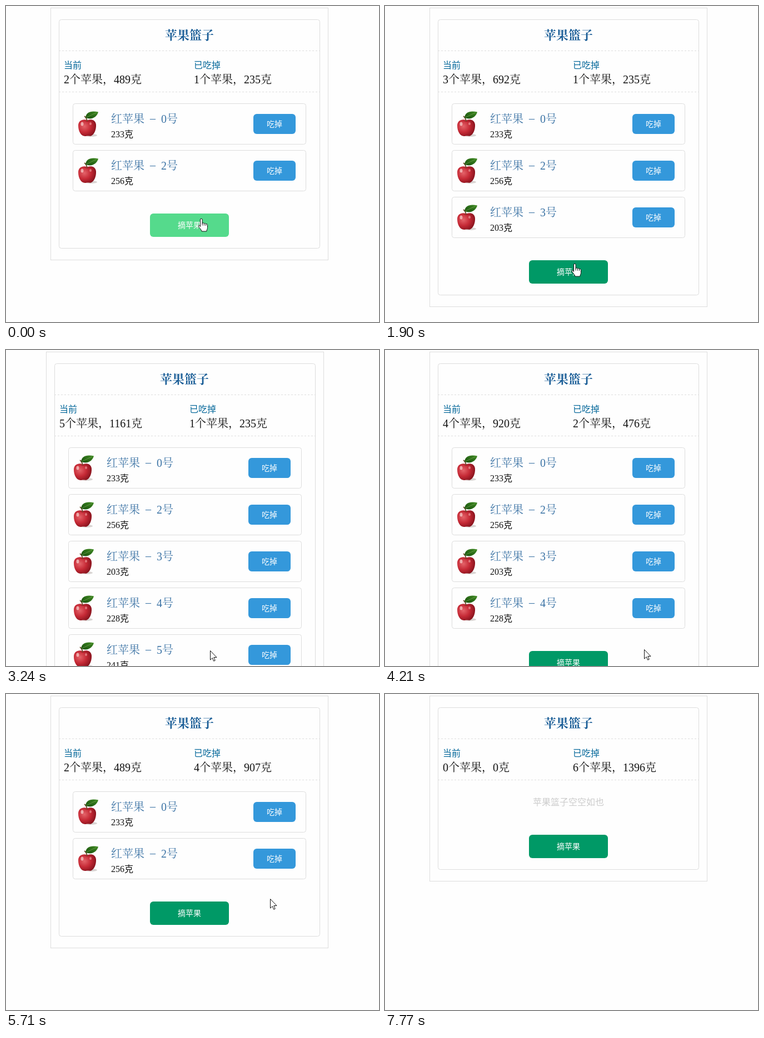
An HTML page for the animation above (7900 ms loop, 671 px wide and 568 px high).

```html
<!DOCTYPE html>
<html lang="zh-CN">
<head>
<meta charset="utf-8">
<title>苹果篮子</title>
<style>
  html, body { margin: 0; width: 100%; height: 100%; overflow: hidden; background: #fefefe; }
  svg { display: block; width: 671px; height: 568px; }
  text {
    font-family: "Liberation Serif", "Noto Serif CJK SC", "Noto Sans CJK SC", "Noto Sans CJK", serif;
    font-size: 20px; font-weight: 300; fill: #111; white-space: pre;
  }
  .mid { text-anchor: middle; }
  .title { font-size: 22px; font-weight: 700; fill: #185c96; }
  .name { fill: #3a72a4; word-spacing: 5px; }
  .label, .small, .btn, .empty {
    font-family: "Liberation Serif", "Noto Sans CJK SC", "Noto Sans CJK", sans-serif;
    font-size: 16px;
  }
  .label { fill: #069; }
  .btn { font-size: 14px; fill: #fff; }
  .empty { fill: #ccc; }
  .line { fill: none; stroke: #ddd; }
  .dash { stroke: #ddd; stroke-dasharray: 3 3; stroke-dashoffset: 1; }
  .cursor { fill: #fff; stroke: #111; stroke-linejoin: round; }
</style>
</head>
<body>
<svg viewBox="0 0 671 568">
  <defs>
    <radialGradient id="skin" cx=".34" cy=".4" r=".72">
      <stop offset="0" stop-color="#e4646a"/>
      <stop offset=".5" stop-color="#c62a36"/>
      <stop offset="1" stop-color="#80101a"/>
    </radialGradient>
    <linearGradient id="leaf" x1="0" y1="1" x2="1" y2="0">
      <stop offset="0" stop-color="#174f0e"/>
      <stop offset="1" stop-color="#3f8a22"/>
    </linearGradient>
    <g id="apple">
      <ellipse cx="153" cy="232.500" rx="11" ry="2.500" fill="#d8d4d2"/>
      <path fill="url(#skin)" d="M146 205.500C140 202.500 130 205 130 215C130 225 135 234 142 234C144 234 145 233.500 147 233.500C149 233.500 151 234 153 233.500C159 231 162.500 222 162 213C161 204 152 203 146 205.500Z"/>
      <path fill="#7a1018" opacity=".55" d="M140 206Q146 209.500 153 206Q147 207 140 206Z"/>
      <ellipse cx="137" cy="212" rx="2.500" ry="3.500" fill="#f8ccca" opacity=".75"/>
      <ellipse cx="152" cy="211.500" rx="2" ry="2.500" fill="#f0a8a6" opacity=".6"/>
      <path fill="none" stroke="#6b4a2a" stroke-width="1.800" d="M141 198Q145 201 146 207"/>
      <path fill="url(#leaf)" d="M143 200.500C144 191 153 187.500 166 190.500C164 199 154 206 143 200.500Z"/>
      <path fill="none" stroke="#86b45e" stroke-width=".6" d="M145 200Q154 196 163 191.500"/>
    </g>
  </defs>

  <g id="page">
    <rect id="outer" class="line" x="80.500" y="3.500" width="499"/>
    <rect id="inner" class="line" x="95.500" y="24.500" width="469" rx="4"/>
    <path class="dash" d="M96 80.500H564M96 154.500H564"/>
    <text id="title" class="mid title" y="60">苹果篮子</text>
    <text class="label" x="104" y="112">当前</text>
    <text class="label" x="338" y="112">已吃掉</text>
    <text id="now" x="104" y="139"></text>
    <text id="eaten" x="338" y="139"></text>
    <text id="empty" class="mid empty" x="330" y="200">苹果篮子空空如也</text>
    <g id="cards"></g>
    <g id="pick">
      <rect id="pickBox" x="259" width="142" height="42" rx="6"/>
      <text class="mid btn" x="330" y="26">摘苹果</text>
    </g>
  </g>

  <g id="cursor" class="cursor">
    <path id="arrow" d="M.5 .5V17L4.300 13.500L6.700 19.200L9.200 18.100L6.800 12.500H12Z"/>
    <g id="hand">
      <path d="M-1.500 14.500V2a1.800 1.800 0 0 1 3.600 0V9C2.100 7.400 5.400 7.600 5.400 9.400C5.600 8.200 8.600 8.400 8.600 10.200C9 9.200 11.500 9.600 11.500 11.400V16.500C11.500 19 10 20 9.800 23H1C.8 20.500 -2.500 17.500 -4.800 14C-5.600 12.400 -3.400 11.400 -2.600 12.600Z"/>
      <path fill="none" d="M2.100 9v3.500M5.400 9.400v3.300M8.600 10.200v2.800"/>
    </g>
  </g>
</svg>

<script>
const LOOP = 7900, PITCH = 84, FULL = 5;
const $ = id => document.getElementById(id);

// Times tell when an apple enters the basket and when it is eaten.
const apples = [
  { no: 0, weight: 233, from: 0, to: 7090 },
  { no: 2, weight: 256, from: 0, to: 6380 },
  { no: 3, weight: 203, from: 680, to: 5710 },
  { no: 4, weight: 228, from: 1917, to: 4880 },
  { no: 5, weight: 241, from: 3110, to: 4210 }
];
const eatenBefore = { weight: 235 };
const picking = [[410, 680], [1640, 1917], [2840, 3110]];

const startPoint = [351, 382];
const moves = [
  { from: 680, to: 1080, steps: 3, at: [341, 463] },
  { from: 1917, to: 2470, steps: 4, at: [347, 546] },
  { from: 3110, to: 3240, steps: 1, at: [367, 540] },
  { from: 3240, to: 3780, steps: 4, at: [464, 534] },
  { from: 3780, to: 3910, steps: 1, at: [466, 538] },
  { from: 4210, to: 4610, steps: 3, at: [473, 462] },
  { from: 4880, to: 5300, steps: 3, at: [475, 368] },
  { from: 5710, to: 6110, steps: 3, at: [475, 291] },
  { from: 6380, to: 6810, steps: 3, at: [474, 207] },
  { from: 7090, to: 7770, steps: 5, at: [648, 581] }
];

$("cards").innerHTML = apples.map((a, i) => `
  <g class="card" transform="translate(0 ${i * PITCH})">
    <rect class="line" x="120.500" y="175.500" width="419" height="73" rx="4"/>
    <use href="#apple"/>
    <text class="name" x="189" y="210">红苹果 <tspan dy="-1">–</tspan><tspan dy="1"> ${a.no}号</tspan></text>
    <text class="small" x="189" y="236">${a.weight}克</text>
    <g class="eat">
      <rect x="445" y="194" width="76" height="36" rx="6" fill="#3498db"/>
      <text class="mid btn" x="483" y="217">吃掉</text>
    </g>
  </g>`).join("");
const cards = [...document.querySelectorAll(".card")];
const eatButtons = [...document.querySelectorAll(".eat")];

const show = (el, on) => el.setAttribute("display", on ? "inline" : "none");
const inside = (x, y, left, top, w, h) => x >= left && x < left + w && y >= top && y < top + h;
const ease = p => p * p * (3 - 2 * p);
const summary = list => `${list.length}个苹果，${list.reduce((sum, a) => sum + a.weight, 0)}克`;

// The pointer advances in a few discrete jumps per move.
function pointer(t) {
  let [x, y] = startPoint;
  for (const m of moves) {
    if (t < m.from) break;
    const part = Math.min(1, (t - m.from) / (m.to - m.from));
    const p = ease(Math.floor(part * m.steps + 1e-6) / m.steps);
    x += (m.at[0] - x) * p;
    y += (m.at[1] - y) * p;
  }
  return [Math.round(x), Math.round(y)];
}

function draw(t) {
  const basket = apples.filter(a => t >= a.from && t < a.to);
  const eaten = [eatenBefore, ...apples.filter(a => t >= a.to)];
  const n = basket.length;
  const grow = n ? n * PITCH : 48;
  const pickTop = 205 + grow;

  // A full basket brings in a scroll bar, which shifts the centred page.
  const shift = n === FULL ? -8 : 0;
  const nudge = n === FULL ? -1 : 0;
  $("page").setAttribute("transform", `translate(${shift} 0)`);
  $("outer").setAttribute("height", 285 + grow);
  $("inner").setAttribute("height", 243 + grow);
  $("title").setAttribute("x", 330 + nudge);
  $("now").textContent = summary(basket);
  $("eaten").textContent = summary(eaten);
  show($("empty"), !n);
  cards.forEach((card, i) => show(card, i < n));
  eatButtons.forEach(b => b.setAttribute("transform", `translate(${nudge} 0)`));

  const [x, y] = pointer(t);
  const overPick = inside(x, y, 259 + shift, pickTop, 142, 42);
  const overEat = basket.some((_, i) => inside(x, y, 445 + shift + nudge, 194 + i * PITCH, 76, 36));
  const busy = picking.some(([a, b]) => t >= a && t < b);
  $("pick").setAttribute("transform", `translate(0 ${pickTop})`);
  $("pickBox").setAttribute("fill", overPick && !busy ? "#55da8c" : "#096");

  $("cursor").setAttribute("transform", `translate(${x} ${y})`);
  show($("hand"), overPick || overEat);
  show($("arrow"), !overPick && !overEat);
}

const begin = performance.now();
function tick() {
  draw((performance.now() - begin) % LOOP);
  requestAnimationFrame(tick);
}
tick();
</script>
</body>
</html>
```
